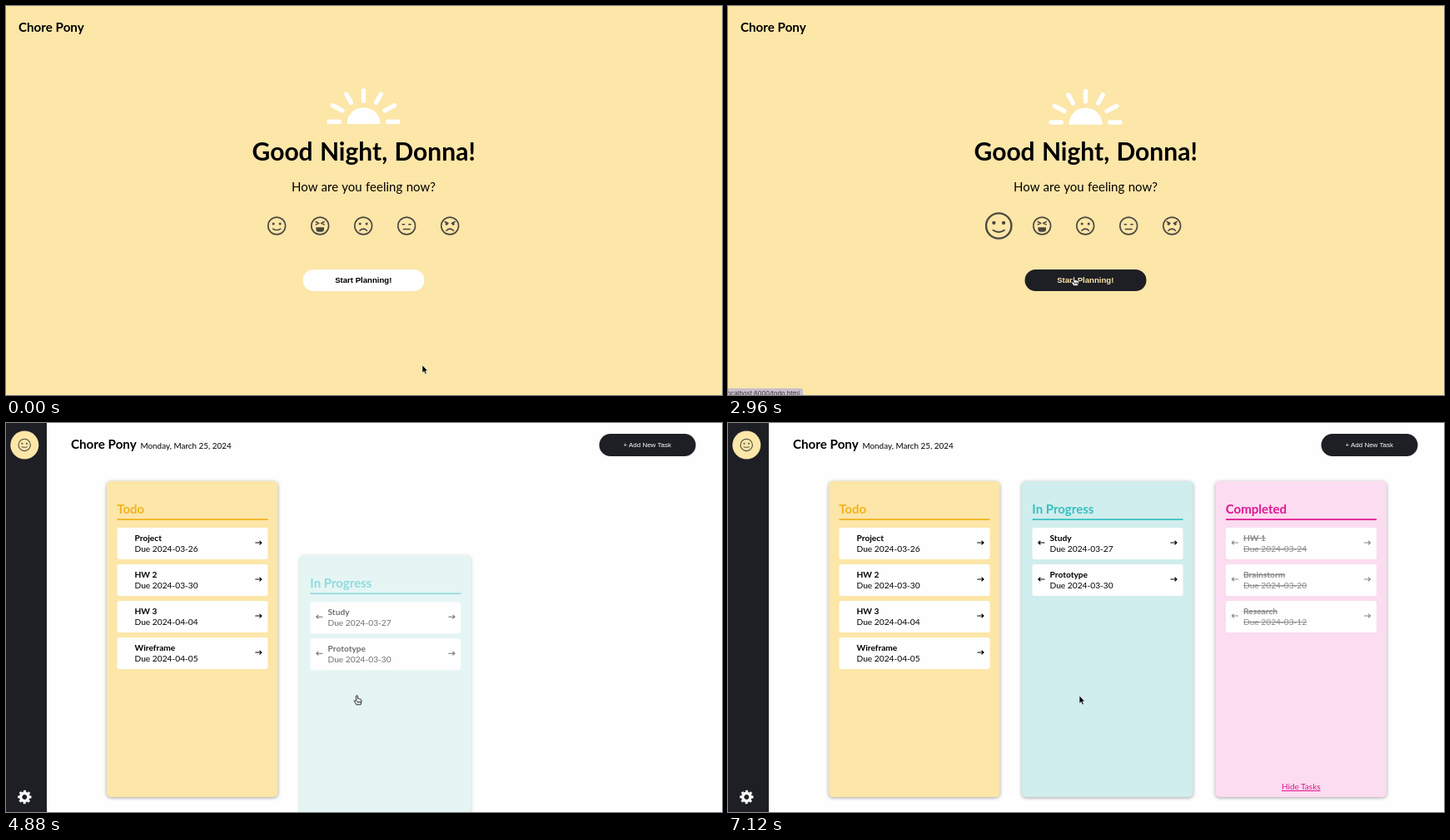
An HTML page that plays this animation: 860x468 px, repeating every 7200 ms.

```html
<!DOCTYPE html>
<html lang="en">
<head>
<meta charset="utf-8">
<title>Planner</title>
<style>
  html, body { margin: 0; width: 100%; height: 100%; overflow: hidden; background: #fefefe; }
  svg { display: block; width: 860px; height: 468px; }
  text { font-family: Lato, "Open Sans", sans-serif; white-space: pre; }
  .brand { font-size: 15.2px; font-weight: 700; }
  .ui { font-family: "Liberation Sans", Arial, sans-serif; text-anchor: middle; }
  .mid { text-anchor: middle; }
  .small { font-size: 10.2px; }
  .bold { font-weight: 700; }
  .done { fill: #8a8a8a; text-decoration: line-through; }
  .line { fill: none; stroke-linecap: round; stroke-linejoin: round; }
  .panel { filter: drop-shadow(0 1.5px 2px rgba(0, 0, 0, .36)); }
</style>
</head>
<body>
<svg id="stage" viewBox="0 0 860 468"></svg>
<script>
const LOOP = 7200, STEP = 80, PAGE_SWITCH = 4000, HOVER_BUTTON = 2800, HAND_OFF = 6480;
const RISE = 800, RISE_FROM = 200;
const DARK = '#1e1f25', SAND = '#fce6a8', INK = '#4b4740', WHITE = '#fefefe';

const text = (x, y, str, cls = '', attrs = '') =>
  `<text x="${x}" y="${y}" class="${cls}" ${attrs}>${str}</text>`;
const rect = (x, y, w, h, r, fill, attrs = '') =>
  `<rect x="${x}" y="${y}" width="${w}" height="${h}" rx="${r}" fill="${fill}" ${attrs}/>`;
const line = (d, color, width) =>
  `<path class="line" d="${d}" stroke="${color}" stroke-width="${width}"/>`;
const dot = (x, y, r) => `<circle cx="${x}" cy="${y}" r="${r}" fill="${INK}"/>`;

// Faces are drawn around 0,0
const eyes = dot(-4, -2.5, 1.5) + dot(4, -2.5, 1.5);
const smile = depth => eyes + line(`M-4.6 3.6Q0 ${3.6 + depth} 4.6 3.6`, INK, 1.4);
const frown = line('M-4.3 5.7Q0 1.4 4.3 5.7', INK, 1.6);
const moods = [
  smile(3),
  line('M-5 -5L-1.4 -3.2L-5 -1.6M5 -5L1.4 -3.2L5 -1.6', INK, 1.5) +
    `<path d="M-4.8 1.8H4.8V4Q4.8 7.3 1.5 7.3H-1.5Q-4.8 7.3 -4.8 4Z" fill="${INK}"/>`,
  eyes + frown,
  line('M-5 -1.8H-2.6M2.6 -1.8H5M-3.8 4H3.8', INK, 1.5),
  line('M-6 -5L-2.2 -3M6 -5L2.2 -3', INK, 1.5) + dot(-4, -2.2, 1.5) + dot(4, -2.2, 1.5) + frown
];
const face = mood => `<circle r="10.4" fill="none" stroke="${INK}" stroke-width="1.6"/>` + mood;

const sun = `<path d="M409.4 142A20.1 20.1 0 0 1 449.6 142Z" fill="${WHITE}"/>` +
  line('M388 139.3H400.5M458.5 139.3H471M392.4 119.6L404 125.8M466.6 119.6L455 125.8' +
       'M408.8 106.2L414.4 116.2M450.2 106.2L444.6 116.2M429.5 101.7V114', WHITE, 5.4);

const welcome = () =>
  rect(0, 0, 860, 468, 0, SAND) +
  text(15, 31, 'Chore Pony', 'brand') +
  `<g id="sun">${sun}</g>` +
  text(429.7, 186, 'Good Night, Donna!', 'mid bold', 'font-size="30" word-spacing="1"') +
  text(429.5, 223, 'How are you feeling now?', 'mid', 'font-size="15" word-spacing=".6"') +
  moods.map((mood, i) => `<g id="mood${i}" transform="translate(${325.2 + 52 * i} 264.5)">${face(mood)}</g>`).join('') +
  rect(356.5, 317, 146, 26, 13, WHITE, 'id="startBox"') +
  text(429.3, 333, 'Start Planning!', 'ui bold', 'id="startText" font-size="9.6"') +
  `<g id="status"><path d="M0 460H87Q90 460 90 463V468H0Z" fill="#c8bec9"/>` +
  text(86, 469, 'localhost:8000/todo.html', '',
       'font-size="7.5" text-anchor="end" fill="#332f38" style="font-family:Inter,sans-serif"') + '</g>';

const columns = [
  { x: 121, start: 4096, name: 'Todo', bg: SAND, color: '#f2b21b',
    tasks: [['Project', '03-26'], ['HW 2', '03-30'], ['HW 3', '04-04'], ['Wireframe', '04-05']] },
  { x: 353, start: 4623, name: 'In Progress', bg: '#d0eeed', color: '#37bfc3', back: true,
    tasks: [['Study', '03-27'], ['Prototype', '03-30']] },
  { x: 585.5, start: 5115, name: 'Completed', bg: '#fbdcf0', color: '#df1593', back: true, done: true,
    tasks: [['HW 1', '03-24'], ['Brainstorm', '03-20'], ['Research', '03-12']] }
];

function card([name, due], i, col) {
  const y = 126 + 44 * i, ink = col.done ? '#8a8a8a' : '#000', cls = col.done ? ' done' : '';
  return rect(12.5, y, 181, 38, 3, WHITE) +
    text(33.5, y + 16, name, 'small bold' + cls) +
    text(33.5, y + 29, 'Due 2024-' + due, 'small' + cls) +
    line(`M178.8 ${y + 18}h7.2m-2.2 -2l2.2 2l-2.2 2`, ink, 1.1) +
    (col.back ? line(`M27 ${y + 18}h-7.2m2.2 -2l-2.2 2l2.2 2`, ink, 1.1) : '');
}

const column = (col, i) => `<g id="col${i}">` +
  rect(0, 70, 205.5, 380, 5, col.bg, 'class="panel"') +
  text(12.3, 109, col.name, 'bold', `font-size="15" fill="${col.color}"`) +
  rect(12.5, 115.2, 181, 1.7, 0, col.color) +
  col.tasks.map((task, n) => card(task, n, col)).join('') +
  (col.done ? text(102.8, 441, 'Hide Tasks', 'mid',
    `font-size="10" fill="${col.color}" text-decoration="underline"`) : '') + '</g>';

const board = () =>
  rect(0, 0, 860, 468, 0, WHITE) + rect(0, 0, 49, 468, 0, DARK) +
  `<circle cx="22.3" cy="26.5" r="17" fill="${SAND}"/>` +
  `<g transform="translate(22.2 26.4) scale(.69)">${face(smile(1.6))}</g>` +
  `<g transform="translate(22.3 450)" fill="none" stroke="${WHITE}"><circle r="4.7" stroke-width="3.4"/>` +
  '<circle r="7" stroke-width="2.4" stroke-dasharray="2.9 2.598" transform="rotate(-12)"/></g>' +
  text(78, 31, 'Chore Pony', 'brand') +
  text(161.5, 31.3, 'Monday, March 25, 2024', '', 'font-size="9.9"') +
  rect(712.5, 13, 116, 27, 13.5, DARK) +
  text(770.2, 29, '+ Add New Task', 'ui', `font-size="8" fill="${WHITE}"`) +
  columns.map(column).join('');

// Both pointers have their hot spot at 0,0
const pointers =
  '<path id="arrow" d="M0 0V9.4L2.1 7.5L3.7 11L5.3 10.3L3.8 6.9H6.6Z" fill="#000" stroke="#fff" stroke-width=".6"/>' +
  '<path id="hand" d="M-1.5 .9Q-1.4 -.3 -.6 -.3Q.3 -.3 .4 .8L.7 4Q1.4 3.2 2.2 4.1Q3.1 3.5 3.7 4.5' +
  'Q4.9 4.3 4.9 5.6V7.6Q4.8 9 4 10.8H-1.2Q-2 9 -3.7 7.1Q-4.2 6.2 -3.4 5.8Q-2.4 5.6 -1.2 6.9Z' +
  'M.4 6.6V8.7M1.9 6.6V8.7M3.3 6.6V8.7" fill="#fff" stroke="#111" stroke-width=".9" stroke-linejoin="round"/>';

const stage = document.getElementById('stage');
stage.innerHTML = `<g id="welcome">${welcome()}</g><g id="board">${board()}</g><g id="pointer">${pointers}</g>`;

const el = id => document.getElementById(id);
const show = (id, on) => el(id).setAttribute('display', on ? 'inline' : 'none');
const move = (id, value) => el(id).setAttribute('transform', value);
const smooth = v => v * v * (3 - 2 * v);

// CSS "ease": cubic-bezier(.25, .1, .25, 1)
function ease(x) {
  if (x <= 0) return 0;
  if (x >= 1) return 1;
  let lo = 0, hi = 1, s = .5;
  for (let i = 0; i < 24; i++) {
    s = (lo + hi) / 2;
    if (.75 * s * (1 - s) + s ** 3 < x) lo = s; else hi = s;
  }
  return .3 * s * (1 - s) ** 2 + 3 * s * s * (1 - s) + s ** 3;
}

// time, x, y
const route = [
  [0, 500, 432], [320, 500, 432], [1040, 390, 280], [1520, 331, 268],
  [2320, 331, 268], [2640, 366, 308], [3040, 422, 328]
];
function pointerAt(t) {
  const n = route.findIndex(p => p[0] > t);
  if (n < 0) return route[route.length - 1].slice(1);
  const a = route[n - 1], b = route[n], k = smooth((t - a[0]) / (b[0] - a[0]));
  return [a[1] + (b[1] - a[1]) * k, a[2] + (b[2] - a[2]) * k];
}

function draw(t) {
  const first = t < PAGE_SWITCH, hover = t >= HOVER_BUTTON;
  show('welcome', first);
  show('board', !first);

  const bob = -1.5 + 10.8 * (.5 - .5 * Math.cos(2 * Math.PI * (t - 183) / 1500));
  move('sun', `translate(0 ${bob})`);
  const size = 1 + .32 * ease((t - 1440) / 300) + .14 * ease((t - 2080) / 300);
  move('mood0', `translate(325.2 264.5) scale(${size})`);
  el('startBox').setAttribute('fill', hover ? DARK : WHITE);
  el('startText').setAttribute('fill', hover ? SAND : '#000');
  show('status', hover);

  columns.forEach((col, i) => {
    const k = ease((t - col.start) / RISE);
    move('col' + i, `translate(${col.x} ${RISE_FROM * (1 - k)})`);
    el('col' + i).setAttribute('opacity', k);
  });

  const [x, y] = pointerAt(t), hand = hover && t < HAND_OFF;
  move('pointer', `translate(${x} ${y})`);
  show('hand', hand);
  show('arrow', !hand);
}

const begin = performance.now();
function tick() {
  const t = (performance.now() - begin) % LOOP;
  draw(Math.floor(t / STEP) * STEP);
  requestAnimationFrame(tick);
}
tick();
</script>
</body>
</html>
```
